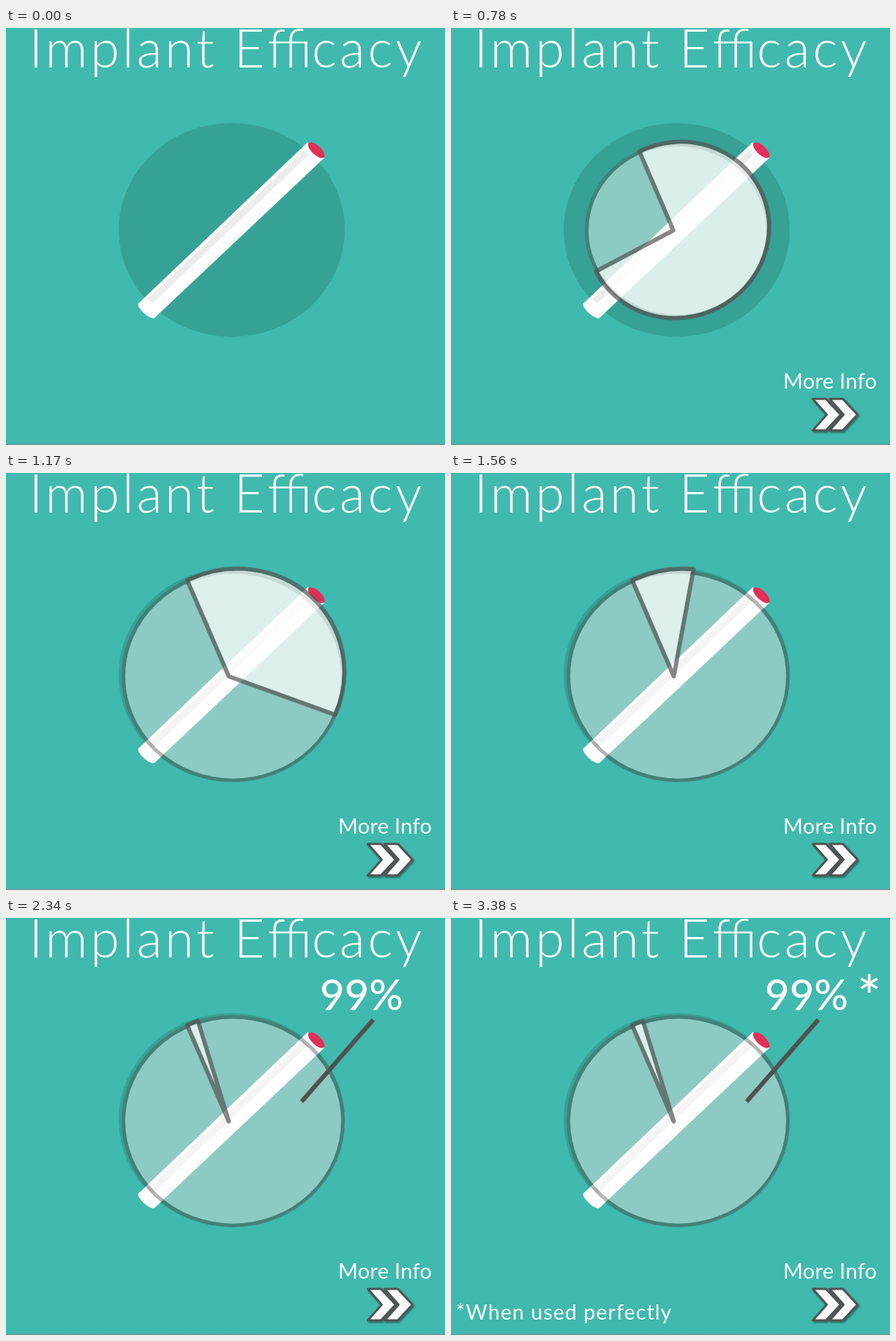
An HTML page for the animation above (7020 ms loop, 600x570 px).

```html
<!DOCTYPE html>
<html lang="en">
<head>
<meta charset="utf-8">
<title>Implant Efficacy</title>
<style>
  html, body { margin: 0; width: 100%; height: 100%; overflow: hidden; background: #40b9ae; }
  svg { display: block; width: 600px; height: 570px; }
  text { font-family: Lato, "Open Sans", sans-serif; fill: #fff; }
  .ink { stroke: #555; stroke-width: 5; stroke-linejoin: round; fill: #fff; }
  #slice { stroke-width: 5.8; }
</style>
</head>
<body>
<svg viewBox="0 0 600 570">
  <defs>
    <linearGradient id="edge" x2="0" y2="1">
      <stop offset="0" stop-color="#888" stop-opacity="0"/>
      <stop offset="1" stop-color="#888" stop-opacity=".7"/>
    </linearGradient>
    <filter id="shadow" x="-20%" y="-20%" width="140%" height="150%">
      <feDropShadow dx="1.5" dy="2" stdDeviation="1.2" flood-color="#000" flood-opacity=".4"/>
    </filter>
  </defs>
  <rect width="600" height="570" fill="#40b9ae"/>
  <rect y="567" width="600" height="3" fill="url(#edge)"/>
  <text x="31.5" y="53.5" font-size="72" font-weight="300" letter-spacing="3.8">Implant E<tspan letter-spacing="0">ffi</tspan>cacy</text>
  <ellipse cx="308.5" cy="276" rx="154.5" ry="146" fill="#36a295"/>

  <g id="rod">
    <ellipse cx="192" cy="386.2" rx="14.8" ry="5" transform="rotate(42 192 386.2)" fill="#fff"/>
    <path d="M412.5 156L435 177.6L203 396.2L181 376.5Z" fill="#fff"/>
    <path d="M193 370.5L200 376.5L413 174L407 167.5Z" fill="#ececec"/>
    <ellipse cx="424.2" cy="167" rx="14.3" ry="6.3" transform="rotate(43 424.2 167)" fill="#e0305a"/>
  </g>

  <g id="pie">
    <g opacity=".435"><ellipse id="disc" class="ink"/></g>
    <g opacity=".7"><path id="slice" class="ink"/></g>
  </g>

  <path id="pointer" stroke="#505252" stroke-width="6" fill="none"/>
  <text id="percent" x="429" y="126" font-size="58" font-weight="500">99%</text>
  <text id="star" x="571.5" y="135" font-size="78" font-weight="500" text-anchor="middle">*</text>
  <text id="note" x="7" y="549" font-size="28.5" letter-spacing="1.1">*When used perfectly</text>

  <g id="more">
    <g id="label"><text x="454" y="492.5" font-size="29" letter-spacing=".3">More Info</text></g>
    <g id="arrows" filter="url(#shadow)">
      <g fill="#fff" stroke="#505252" stroke-width="3" stroke-linejoin="round">
        <path d="M494.5 507H512.5L532.5 528.5L512.5 550H494.5L513.5 528.5Z"/>
        <path d="M517.5 507H535.5L555.5 528.5L535.5 550H517.5L536.5 528.5Z"/>
      </g>
    </g>
  </g>
</svg>
<script>
const LOOP = 7020, STEP = 130, TILT = -23 * Math.PI / 180;
const $ = id => document.getElementById(id);
const set = (id, attrs) => {
  for (const k in attrs) $(id).setAttribute(k, attrs[k]);
};
const show = (id, on) => set(id, { visibility: on ? "visible" : "hidden" });
const ease = (t, from, to) => {
  const u = Math.min(1, Math.max(0, (t - from) / (to - from)));
  return (1 - Math.cos(Math.PI * u)) / 2;
};
const zoom = (x, y, s) => `translate(${x} ${y}) scale(${s}) translate(${-x} ${-y})`;

function drawPie(t) {
  const s = ease(t, 250, 980);
  show("pie", s > 0);
  set("pie", { opacity: 0.91 + 0.09 * s });
  set("disc", { cx: 304 + 6.5 * s, cy: 273 + 4.7 * s, rx: 150 * s, ry: 142.5 * s });

  // the light slice belongs to a tilted ellipse and shrinks clockwise
  const cx = 304 + 7.5 * s, cy = 272.5 + 4.3 * s, rx = 152 * s, ry = 144.9 * s;
  const rim = deg => {
    const a = deg * Math.PI / 180, x = rx * Math.cos(a), y = ry * Math.sin(a);
    return [cx + x * Math.cos(TILT) - y * Math.sin(TILT),
            cy + x * Math.sin(TILT) + y * Math.cos(TILT)];
  };
  const swept = 354 * ease(t, 235, 1845);
  const large = swept < 180 ? 1 : 0;
  set("slice", {
    d: `M${301 + 3.5 * s} ${270 + 8 * s}L${rim(-93)}` +
       `A${rx} ${ry} -23 ${large} 1 ${rim(-93 - swept)}Z`
  });
}

function drawMore(t) {
  const bounce = t < 780 ? 1 - Math.exp(-0.0062 * t) * Math.cos(Math.PI * t / 260) : 1;
  show("more", t >= STEP);
  set("label", { transform: zoom(455, 483, Math.min(bounce, 1.047)) });
  set("arrows", { transform: zoom(525, 529, bounce) });
}

function draw(t) {
  drawPie(t);
  drawMore(t);
  const p = ease(t, 1820, 2210);
  show("pointer", p > 0);
  set("pointer", { d: `M404 251L${404 + 98 * p} ${251 - 112 * p}` });
  show("percent", t >= 2340);
  show("star", t >= 2860);
  show("note", t >= 3380);
}

const start = performance.now();
function tick() {
  const t = (performance.now() - start) % LOOP;
  draw(Math.floor(t / STEP) * STEP);
  requestAnimationFrame(tick);
}
tick();
</script>
</body>
</html>
```
